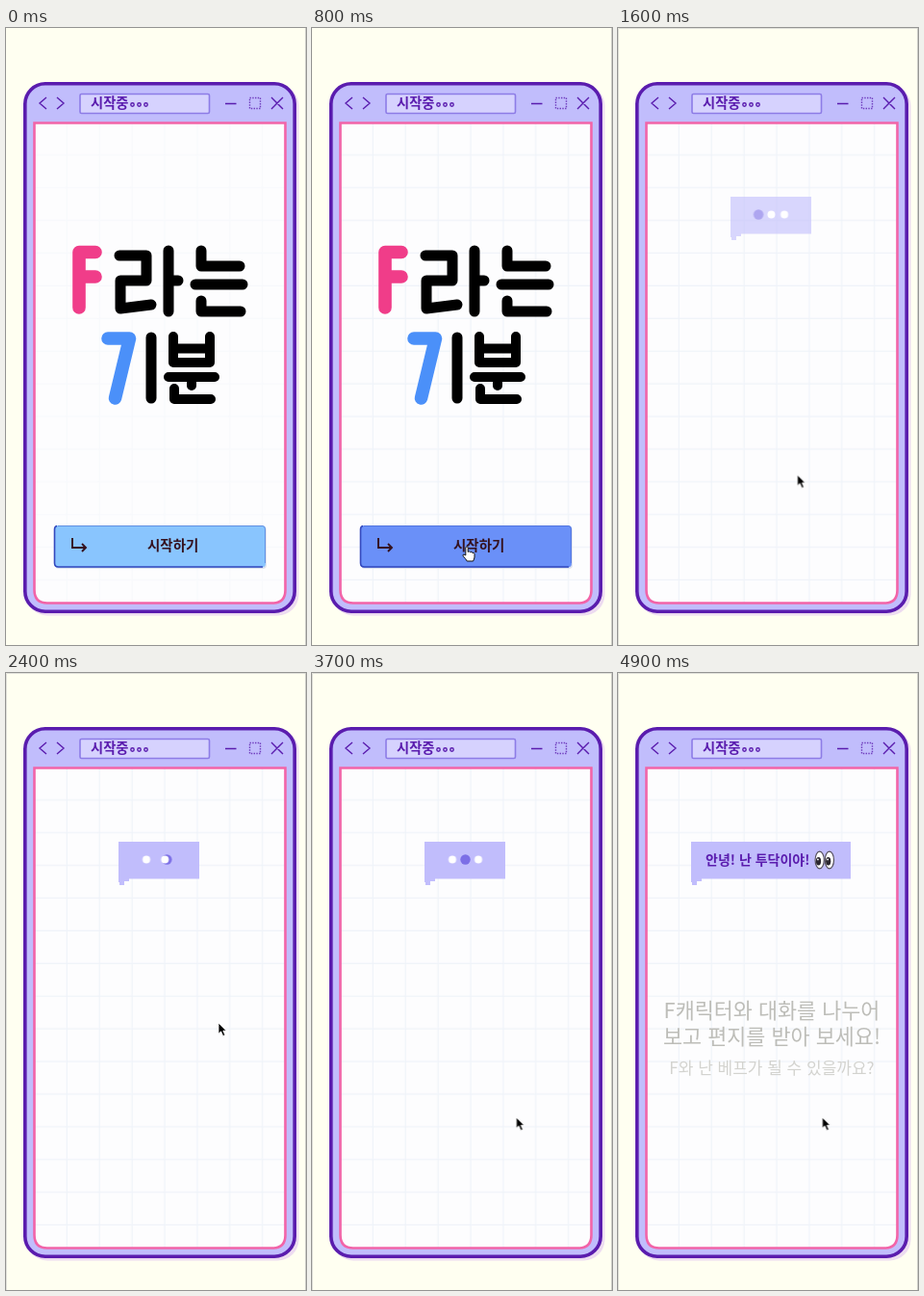
These frames come from a looping animation (312 by 640 pixels, 5 s). An HTML page:

```html
<!DOCTYPE html>
<html lang="ko">
<head>
<meta charset="utf-8">
<title>시작</title>
<style>
  html, body { margin: 0; width: 100%; height: 100%; overflow: hidden; background: #fffff1; }
  svg { display: block; width: 312px; height: 640px; }
  text { font-family: "Noto Sans CJK KR", "Noto Sans CJK", "Noto Sans", sans-serif; }
  .line { fill: none; stroke: #5a1cae; stroke-width: 1.4; }
  .letter { fill: none; stroke: #000; stroke-width: 11; stroke-linecap: round; stroke-linejoin: round; }
  .anim, .anim * { animation: 5s ease-out infinite both; }

  #edge { animation-name: edge; animation-timing-function: step-end; }
  #grid { animation-name: grid; }
  #start { animation-name: start; }
  #button { animation-name: press; animation-timing-function: step-end; }
  #face { animation-name: face; }
  #label { animation-name: label; }
  #bubble { animation-name: bubble; }
  #body { animation-name: body; }
  #tail { animation-name: tail; }
  #dots { animation-name: dots; animation-timing-function: step-end; }
  #active { animation-name: active; }
  #left { animation-name: left; }
  #right { animation-name: right; }
  #hello { animation-name: hello; }
  #intro { animation-name: intro; }
  #cursor { animation-name: move; animation-timing-function: ease-in-out; }
  #arrow { animation-name: arrow; animation-timing-function: step-end; }
  #hand { animation-name: hand; animation-timing-function: step-end; }

  @keyframes edge { 0% { opacity: 0 } 20%, 100% { opacity: 1 } }
  @keyframes grid { 0%, 1% { opacity: .4 } 12%, 100% { opacity: 1 } }
  @keyframes start { 0%, 27% { opacity: 1 } 32%, 100% { opacity: 0 } }
  @keyframes press { 0% { transform: none } 22%, 100% { transform: translate(1px, 1px) } }
  @keyframes face {
    0%, 7% { fill: #89c5fe }
    12%, 16% { fill: #6a90f8 }
    25%, 100% { fill: #5a5dcb }
  }
  @keyframes label { 0%, 16% { color: #35121f } 25%, 100% { color: #1f1c5c } }
  @keyframes bubble { 0%, 29% { opacity: 0 } 36%, 100% { opacity: 1 } }
  @keyframes body {
    0%, 90% { x: 117px; width: 84px }
    92% { x: 80px; width: 159px }
    96%, 100% { x: 76px; width: 166px }
  }
  @keyframes tail {
    0%, 90% { transform: translateX(117px) }
    92% { transform: translateX(80px) }
    96%, 100% { transform: translateX(76px) }
  }
  @keyframes dots { 0% { opacity: 1 } 91%, 100% { opacity: 0 } }
  @keyframes active {
    0%, 32% { transform: translateX(-13.5px) }
    36%, 39% { transform: none }
    42%, 47% { transform: translateX(13.5px) }
    50.6%, 54.5% { transform: none }
    64%, 66.5% { transform: translateX(-13.5px) }
    74%, 77% { transform: none }
    84%, 100% { transform: translateX(13.5px) }
  }
  @keyframes left {
    0%, 32% { transform: none }
    36%, 54.5% { transform: translateX(-13.5px) }
    64%, 66.5% { transform: none }
    74%, 100% { transform: translateX(-13.5px) }
  }
  @keyframes right {
    0%, 39% { transform: translateX(13.5px) }
    42%, 47% { transform: none }
    50.6%, 77% { transform: translateX(13.5px) }
    84%, 100% { transform: none }
  }
  @keyframes hello { 0%, 90.5% { opacity: 0 } 92% { opacity: .6 } 97%, 100% { opacity: 1 } }
  @keyframes intro { 0%, 92.5% { opacity: 0 } 98%, 100% { opacity: 1 } }
  @keyframes move {
    0%, 1% { transform: translate(316px, 596px) }
    12%, 27% { transform: translate(161px, 538px) }
    38%, 66.5% { transform: translate(221px, 363px) }
    74%, 100% { transform: translate(212.5px, 461px) }
  }
  @keyframes arrow { 0% { opacity: 1 } 8% { opacity: 0 } 28%, 100% { opacity: 1 } }
  @keyframes hand { 0% { opacity: 0 } 8% { opacity: 1 } 28%, 100% { opacity: 0 } }
</style>
</head>
<body>
<svg viewBox="0 0 312 640">
  <defs>
    <pattern id="cells" x="30" y="98.5" width="33.9" height="33.9" patternUnits="userSpaceOnUse">
      <path d="M33.3 0V33.9M0 33.3H33.9" stroke="#eff3f9" stroke-width="1.2"/>
    </pattern>
    <path id="screen" d="M29.5 98.5H290.5V583Q290.5 596.5 277 596.5H43Q29.5 596.5 29.5 583Z"/>
    <g id="eye">
      <ellipse rx="4.6" ry="8.8" fill="#fff" stroke="#55505c" stroke-width="1.2"/>
      <ellipse cx="-1.2" cy="1.2" rx="2.6" ry="4.2" fill="#2c2830"/>
      <circle cx="-1.8" cy="-.6" r=".9" fill="#fff"/>
    </g>
  </defs>

  <rect width="312" height="640" fill="#fffff1"/>
  <path d="M311.5 0V640" stroke="#d2d2cc"/>
  <g class="anim"><path id="edge" d="M.5 640V.5H311" fill="none" stroke="#e2e2db"/></g>

  <!-- window -->
  <rect x="21" y="59" width="283.5" height="550.5" rx="22" fill="#eddcf0"/>
  <rect x="19.8" y="57.8" width="280.4" height="547.4" rx="21" fill="#c1bdfc" stroke="#5a1cae" stroke-width="3.6"/>
  <use href="#screen" fill="#fdfdfe"/>
  <g class="anim"><use id="grid" href="#screen" fill="url(#cells)"/></g>
  <use href="#screen" fill="none" stroke="#f264a8" stroke-width="2.6"/>

  <!-- title bar -->
  <path class="line" d="M42 72L35 78L42 84M53 72L60 78L53 84M228 78.5H239.5M276 72L288 84M288 72L276 84"/>
  <rect class="line" x="253.5" y="72.5" width="11" height="11" stroke-dasharray="1.4 1.35" opacity=".8"/>
  <rect x="77" y="68.5" width="134.5" height="20" rx="1.5" fill="#d6d2fe" stroke="#8d7ce6" stroke-width="1.6"/>
  <text x="88" y="83" font-size="14.3" font-weight="700" fill="#5a1cae">시작중</text>
  <g class="line">
    <circle cx="131.5" cy="79.5" r="1.7"/><circle cx="138.5" cy="79.5" r="1.7"/><circle cx="145.5" cy="79.5" r="1.7"/>
  </g>

  <!-- start page -->
  <g class="anim">
    <g id="start">
      <g class="letter" role="img" aria-label="F라는 기분">
        <path d="M93 232.5H76V290M76 258H93" stroke="#f03d89" stroke-width="13.6"/>
        <path d="M118 236H146V262H119V291L151 287M169 231V294M169 262H179"/>
        <path d="M203 231V247H243M197 266H246M203 283V294H244"/>
        <path d="M106 322H128.5L113.5 384" stroke="#4b90f9" stroke-width="13.6"/>
        <path d="M151 321V384"/>
        <path d="M174 320V347H212V320M174 332.5H212M169 362H217M193 362V371M175 374V385H213" stroke-width="10"/>
      </g>
      <g id="button">
        <rect x="51" y="517" width="220" height="44" rx="4" fill="#dfe3ee"/>
        <rect id="face" x="50" y="516" width="220" height="43.5" rx="4"/>
        <path d="M54 516.5H267Q269.5 516.5 269.5 520V555" fill="none" stroke="#3a5cc8" stroke-opacity=".5"/>
        <path d="M53 516.5Q50.5 517 50.5 520V555Q50.5 559 54.5 559H267" fill="none" stroke="#3348bd" stroke-width="1.6"/>
        <g id="label">
          <path d="M69 529V539H83M79 535L83 539L79 543" fill="none" stroke="currentColor" stroke-width="1.9"/>
          <text x="147" y="542" font-size="14.5" font-weight="700" fill="currentColor">시작하기</text>
        </g>
      </g>
    </g>
  </g>

  <!-- chat page -->
  <g class="anim">
    <g id="bubble">
      <g fill="#c1bdfc">
        <rect id="body" x="117" y="175" width="84" height="38.5"/>
        <path id="tail" d="M0 213H11V216H6V220H1V217H0Z"/>
      </g>
      <g id="dots" fill="#fff">
        <circle id="left" cx="159.5" cy="193.5" r="4"/>
        <circle id="active" cx="159.5" cy="193.5" r="5.2" fill="#7c6fe6"/>
        <circle id="right" cx="159.5" cy="193.5" r="4"/>
      </g>
      <g id="hello">
        <text x="91" y="199" font-size="14" font-weight="700" fill="#5a1cae">안녕! 난 투닥이야!</text>
        <use href="#eye" x="209.7" y="194"/><use href="#eye" x="219.9" y="194"/>
      </g>
    </g>
    <g id="intro" text-anchor="middle" font-weight="500">
      <g font-size="21.8" fill="#bdbdb8">
        <text x="160" y="358">F캐릭터와 대화를 나누어</text>
        <text x="160" y="385">보고 편지를 받아 보세요!</text>
      </g>
      <text x="160" y="415.5" font-size="17" fill="#d3d3cf">F와 난 베프가 될 수 있을까요?</text>
    </g>
  </g>

  <g class="anim">
    <g id="cursor" stroke="#fff" stroke-linejoin="round">
      <path id="arrow" d="M0 0V11.2L2.6 8.8L4.7 13.5L6.8 12.6L4.8 8.1H8.2Z" fill="#000" stroke-width=".8"/>
      <path id="hand" d="M-1.2 9V.6Q0-1 1.2.6V5.4Q2.6 4.2 3.6 5.8Q5 4.8 6 6.4Q7.6 5.8 8 7.6V11Q7.6 13 6.6 15H.2Q-1 12.6-3.8 9.8Q-4.6 8-3 8Z" fill="#fff" stroke="#111"/>
    </g>
  </g>
</svg>
</body>
</html>
```
